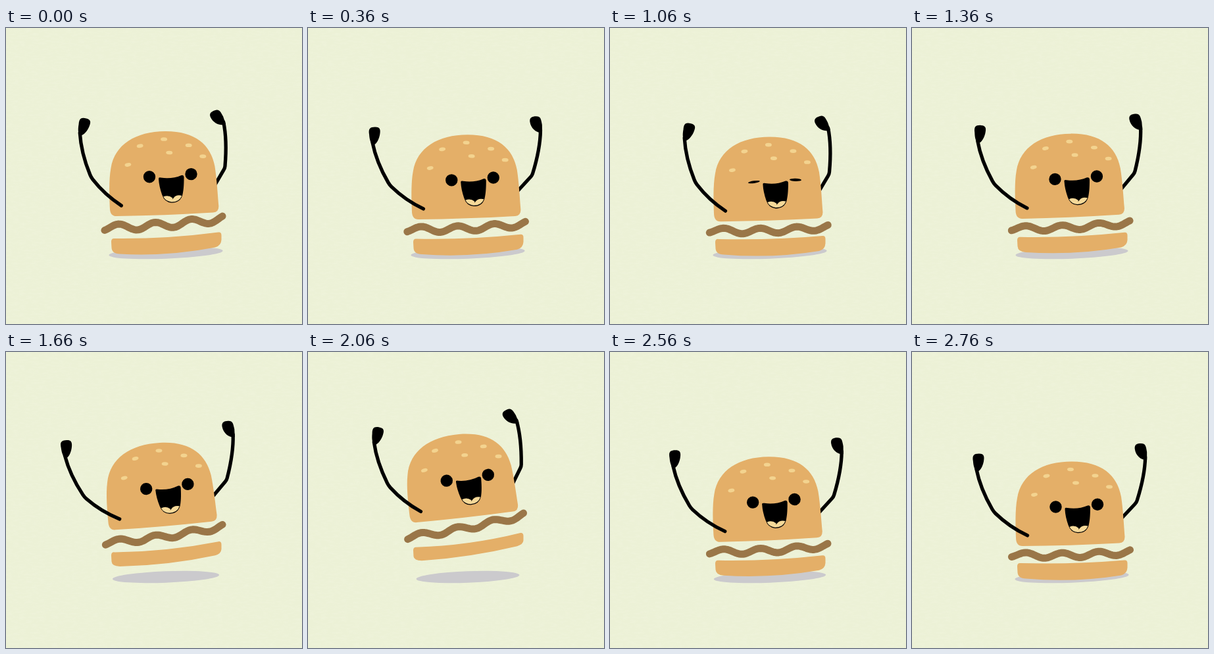
An HTML page for the animation above (2860 ms loop, 450 px wide and 450 px high).

```html
<!DOCTYPE html>
<html lang="en">
<head>
<meta charset="utf-8">
<title>Happy burger</title>
<style>
  html, body { margin: 0; width: 100%; height: 100%; overflow: hidden; background: #ecf1d6; }
  svg { display: block; width: 100vw; height: 100vh; }
  .limb { fill: none; stroke: #000; stroke-width: 5.3; stroke-linecap: round; stroke-linejoin: round; }
  .bread { fill: #e4af68; }
  .seeds { fill: #f3d38f; }
</style>
</head>
<body>
<svg viewBox="0 0 450 450">
  <defs>
    <filter id="paper" x="0" y="0" width="1" height="1">
      <feTurbulence type="fractalNoise" baseFrequency=".1 .35" numOctaves="2" seed="4"/>
      <feColorMatrix values="0 0 0 0 1  0 0 0 0 1  0 0 0 0 .93  .7 0 0 0 -.27"/>
    </filter>
  </defs>
  <rect width="450" height="450" fill="#ecf1d6"/>
  <rect width="450" height="450" filter="url(#paper)" opacity=".35"/>

  <ellipse id="shadow" cx="243" cy="342" ry="8.7" fill="#cbcacd" transform="rotate(-2.2 243 342)"/>
  <path id="base" class="bread"/>
  <path id="patty" fill="none" stroke="#9a7648" stroke-width="11" stroke-linecap="round" stroke-linejoin="round"/>

  <g id="body">
    <g id="armR">
      <path class="limb" d="M310 262L339 231Q341 229 342 226Q354 188 354.500 160"/>
      <path id="handR" d="M338.500 147C338 140.500 342 139 348 139C355 139 355.500 143 357 152L357 164C350 165 340 159 338.500 147Z"/>
    </g>
    <path class="bread" d="M158 282C157.500 266 156.500 240 160 222C166 186 198 166.500 243 166.500C288 166.500 312 187 318 220C321 240 322 262 323.500 281Q323.500 290 315 290.500Q240 294.500 168 295Q158 295 158 282Z"/>
    <g id="seeds" class="seeds"></g>
    <g id="eyes">
      <circle cx="218.500" cy="235.500" r="9.200"/>
      <circle cx="282" cy="231.800" r="9.200"/>
    </g>
    <g id="blink">
      <ellipse cx="219" cy="235" rx="9" ry="1.800" transform="rotate(-8 219 235)"/>
      <ellipse cx="282" cy="231.800" rx="9" ry="2.100" transform="rotate(2 282 231.800)"/>
    </g>
    <path d="M232.500 239Q232 236 236 237Q253 239.500 267 233.500Q271 232.500 271 237C271 250 270 258 268.500 264Q265 275.300 252 275.300Q241 274.500 237.500 263Q233 250 232.500 239Z"/>
    <path fill="#f6d999" d="M239.500 266Q247 262.500 253.500 268L253 270L255 268Q259 262.500 267.500 264.500Q264 274 252 274Q243 273 239.500 266Z"/>
    <g id="armL">
      <path class="limb" d="M175.500 279Q148 266 127 245.500Q124 242.500 122 239Q104 208 98 178"/>
      <path id="handL" d="M93 166C91.500 157 94 154.500 102 154.500C110 154.500 110.500 159 109 167C107 176 103 181 99.500 182C95 180 93.500 173 93 166Z"/>
    </g>
  </g>
</svg>
<script>
const LOOP = 2860, BLINK = 1060;
const SEEDS = [[186, 217], [204.5, 188.5], [241, 178.5], [249, 199], [278.5, 188], [300, 205]];
const el = id => document.getElementById(id);
const set = (id, name, value) => el(id).setAttribute(name, value);
const turn = (id, angle, x, y) => set(id, "transform", `rotate(${angle} ${x} ${y})`);
const cycle = (t, period) => Math.cos(2 * Math.PI * t / period);

el("seeds").innerHTML = SEEDS.map(([x, y], i) =>
  `<ellipse cx="${x}" cy="${y}" rx="5" ry="2.800" transform="rotate(${i < 2 ? -10 : 2} ${x} ${y})"/>`).join("");

// One leap, 0 on the ground to 1 at the top
const leap = t => Math.abs(t - 1975) < 800 ? (1 + cycle(t - 1975, 1600)) / 2 : 0;

// Arm swing with short rests: 0 spread, 1 raised inwards
const swing = t => 0.5 + 0.56 * Math.tanh(1.8 * cycle(t + 40, 1080));

// A wavy, slightly sagging line
function pattyPath(height) {
  const points = [];
  for (let x = -90; x <= 90; x += 3) {
    const sag = 3 * (1 - (x / 90) ** 2);
    points.push(`${x} ${(sag - 0.025 * x - height * cycle(x + 13, 55)).toFixed(2)}`);
  }
  return "M" + points.join("L");
}

// Bottom bun from the heights of its upper corners; it thickens under weight
function basePath(left, right, weight) {
  const mid = (left + right) / 2, bow = mid + 3 + (left - right) * 0.26;
  const fat = 20 + 3 * weight;
  return `M160 ${left + 5}Q160 ${left - 0.5} 165 ${left}Q244 ${bow} 323 ${right - 0.5}` +
    `Q327.500 ${right - 1} 327.500 ${right + 4}L327.500 ${right + 11}` +
    `Q327 ${right + fat - 3} 318 ${right + fat - 0.5}` +
    `Q246 ${mid + 26 + 6 * weight} 173 ${left + fat + 0.5}Q161 ${left + fat} 160.500 ${left + 14}Z`;
}

function draw(t) {
  const up = leap(t), settle = Math.exp(-t / 450), arms = swing(t);

  set("shadow", "rx", 86.7 - 8.4 * up);
  set("base", "d", basePath(321 - 25 * up - settle, 317 - 42.5 * up - 6 * settle, 1 - up));
  set("patty", "d", pattyPath(4 + settle));
  set("patty", "transform",
    `translate(${241.5 - 2 * up - 2 * settle} ${306 - 42.5 * up - 9.5 * settle}) rotate(${-9.6 * up - 3 * settle})`);
  set("body", "transform",
    `translate(${-8.2 * up - 0.5 * settle} ${-43.5 * up - 9.5 * settle}) rotate(${-4.8 * up - 0.4 * settle} 250 233.500)`);

  turn("armL", 8 * arms, 175.5, 279);
  turn("handL", 6 * arms, 99, 180);
  turn("armR", -12 * arms, 310, 262);
  turn("handR", -6 * arms, 355, 163);

  const shut = t === BLINK;
  el("eyes").style.display = shut ? "none" : "";
  el("blink").style.display = shut ? "" : "none";
}

// The picture advances on tenths of a second after a short first hold
function tick() {
  const t = performance.now() % LOOP;
  draw(Math.max(0, 60 + 100 * Math.floor((t - 60) / 100)));
  requestAnimationFrame(tick);
}
tick();
</script>
</body>
</html>
```
